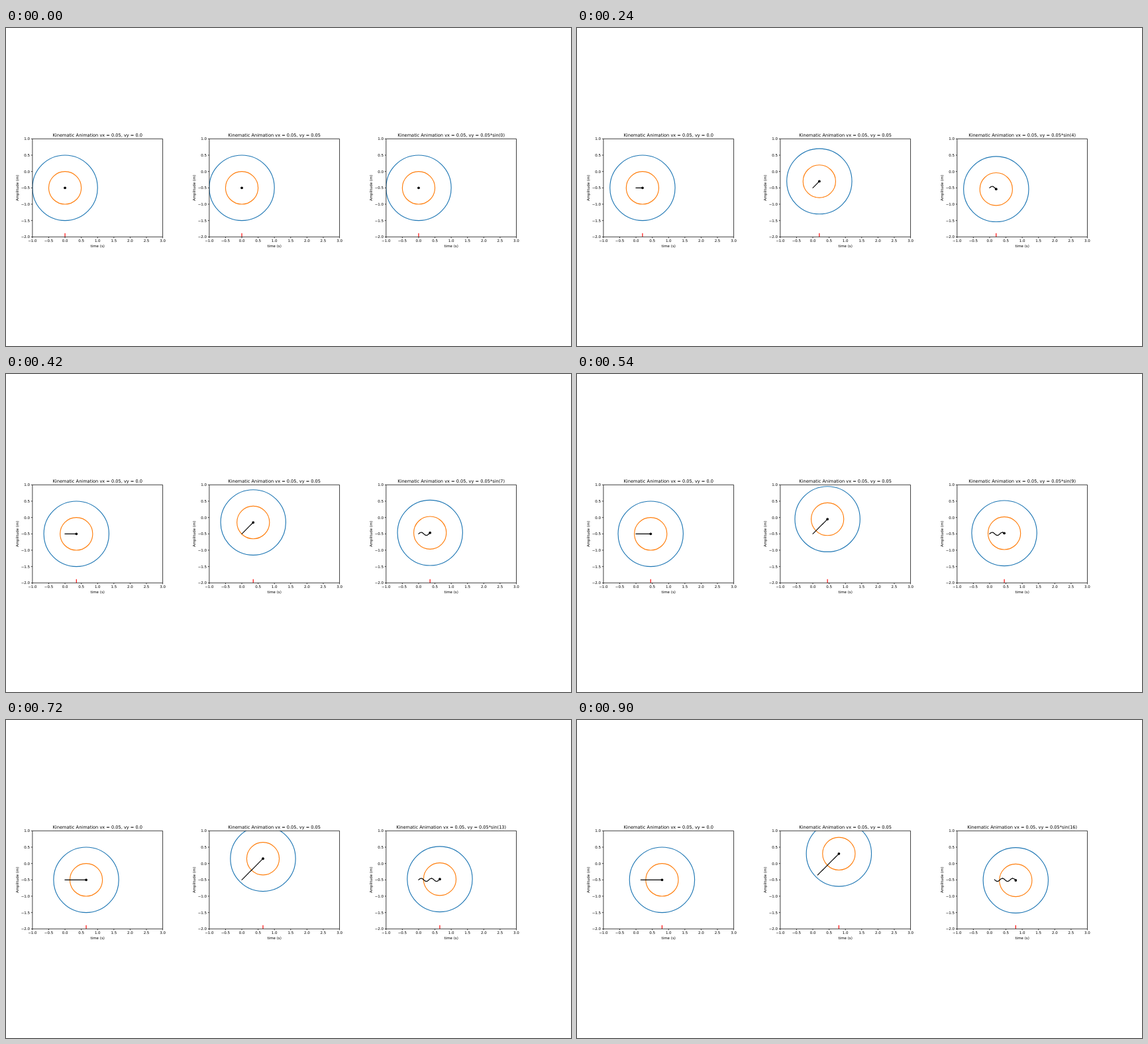
These frames come from a looping animation (853x480 px, 960 ms). An HTML page:

```html
<!DOCTYPE html>
<html lang="en">
<head>
<meta charset="utf-8">
<title>Kinematic Animation</title>
<style>
  html, body { margin: 0; width: 100%; height: 100%; overflow: hidden; background: #fff; }
  svg { display: block; }
  text { font: 5.51px "DejaVu Sans", sans-serif; text-anchor: middle; text-rendering: geometricPrecision; }
  .title { font-size: 6.62px; }
  .tick { text-anchor: end; }
  .frame { fill: none; stroke: #000; stroke-width: .75; }
  .line { fill: none; stroke-width: 1.15; }
</style>
</head>
<body>
<svg id="stage" width="853" height="480" viewBox="0 0 853 480"></svg>
<script>
const LEFT = 39.9, TOP = 167.3, WIDTH = 196.7, HEIGHT = 148, GAP = 266.95;
const BOTTOM = TOP + HEIGHT, MIDDLE = LEFT + WIDTH / 2;
const SX = WIDTH / 4, SY = HEIGHT / 3;
const STEP_MS = 60, STEPS = 16, TRAIL = 14;

const px = x => LEFT + (x + 1) * SX;
const py = y => TOP + (1 - y) * SY;
const label = v => v.toFixed(1).replace('-', '\u2212');
const posX = n => 0.05 * n;

// Vertical position and title ending of each panel at step n
const panels = [
  { y: n => -0.5, vy: n => '0.0' },
  { y: n => -0.5 + 0.05 * n, vy: n => '0.05' },
  { y: n => -0.5 + 0.05 * Math.sin(n), vy: n => `0.05*sin(${n})` }
];

function axes() {
  let marks = '', labels = '';
  for (let v = -1; v <= 3; v += 0.5) {
    marks += `M${px(v)} ${BOTTOM}v1.95`;
    labels += `<text x="${px(v)}" y="323.2">${label(v)}</text>`;
  }
  for (let v = -2; v <= 1; v += 0.5) {
    marks += `M${LEFT} ${py(v)}h-1.95`;
    labels += `<text class="tick" x="36.1" y="${py(v) + 2.05}">${label(v)}</text>`;
  }
  return `<path class="frame" d="M${LEFT} ${TOP}h${WIDTH}v${HEIGHT}h${-WIDTH}z${marks}"/>${labels}
    <text x="${MIDDLE}" y="331.1">time (s)</text>
    <text transform="translate(19 ${TOP + HEIGHT / 2}) rotate(-90)">Amplitude (m)</text>`;
}

const ring = (r, color) =>
  `<ellipse class="line" rx="${r * SX}" ry="${r * SY}" stroke="${color}"/>`;

const stage = document.getElementById('stage');
stage.innerHTML = `<clipPath id="plot"><rect x="${LEFT}" y="${TOP}" width="${WIDTH}" height="${HEIGHT}"/></clipPath>` +
  panels.map((p, i) => `<g class="panel" transform="translate(${i * GAP} 0)">
    <g clip-path="url(#plot)">
      <g class="body">${ring(1, '#1f77b4')}${ring(0.5, '#ff7f0e')}<circle r="1.9"/></g>
      <polyline class="line" stroke="#000" stroke-linejoin="round" stroke-linecap="square"/>
      <path class="line now" stroke="#f00" d="M0 ${BOTTOM}V${py(-1.9) - 0.5}"/>
    </g>
    ${axes()}
    <text class="title" x="${MIDDLE}" y="163.8"></text>
  </g>`).join('');

const groups = [...stage.querySelectorAll('.panel')];

function draw(n) {
  panels.forEach((panel, i) => {
    const find = selector => groups[i].querySelector(selector);
    const x = px(posX(n));
    const points = [];
    for (let k = Math.max(0, n - TRAIL + 1); k <= n; k++) points.push([px(posX(k)), py(panel.y(k))]);
    find('.body').setAttribute('transform', `translate(${x} ${py(panel.y(n))})`);
    find('polyline').setAttribute('points', points.join(' '));
    find('.now').setAttribute('transform', `translate(${x} 0)`);
    find('.title').textContent = `Kinematic Animation vx = 0.05, vy = ${panel.vy(n)}`;
  });
}

function tick() {
  const step = Math.floor(performance.now() / STEP_MS) % STEPS;
  draw(step > 10 ? step + 1 : step); // the motion skips value 11
  requestAnimationFrame(tick);
}
tick();
</script>
</body>
</html>
```
